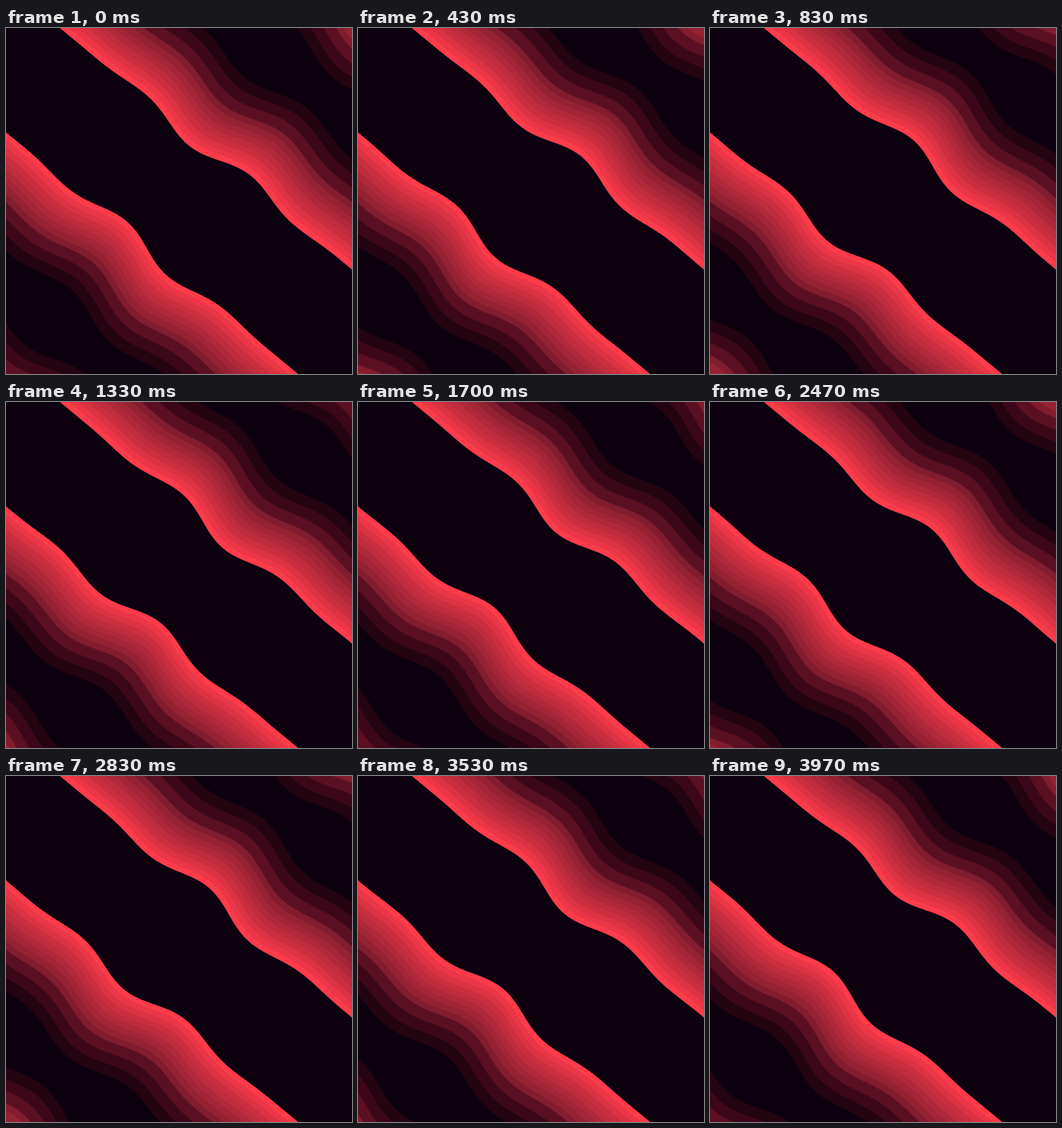
An HTML page with a canvas for the animation above (4.01 s loop, 480x480 px).

```html
<!DOCTYPE html>
<html lang="en">
<head>
<meta charset="utf-8">
<title>Red waves</title>
<style>
  html, body { margin: 0; width: 100%; height: 100%; overflow: hidden; background: #0d010f; }
  canvas { display: block; }
</style>
</head>
<body>
<canvas id="stage" width="480" height="480"></canvas>
<script>
const ctx = document.getElementById('stage').getContext('2d');
const LOOP = 4010, FRAMES = 120, CYCLE = 60;
const DARK = '#0d010f';
const ANGLE = 0.691, REACH = 350;
const HALF = 79.6, REPEAT = 480;            // dark strip half width, distance between strips
const WAVE = 208, AMP = 12.5, FADE = 245, SHIFT = 43;

// Distance from the strip's edge at which each colour begins
const bands = [
  [0, '#fd3b4a'], [8, '#ea3646'], [16, '#db3343'], [24, '#cb2f3f'],
  [32, '#be2c3d'], [40, '#b0293a'], [48, '#a32537'], [56, '#952233'],
  [65, '#821c2f'], [74, '#5a1022'], [90, '#3c0819'], [106, '#230410'], [122, DARK]
];

function ripple(x, frame) {
  if (Math.abs(x) > FADE) return 0;
  const envelope = Math.cos(Math.PI * x / (2 * FADE)) ** 2;
  return -AMP * envelope * Math.cos(2 * Math.PI * ((x + SHIFT) / WAVE + frame / CYCLE));
}

// Fills everything beyond a wavy line on one side of the axis
function fillBeyond(side, distance, sway, frame, color) {
  ctx.beginPath();
  ctx.moveTo(-REACH, side * REACH);
  for (let x = -REACH; x <= REACH; x += 2) {
    ctx.lineTo(x, side * (distance + sway * ripple(x, frame)));
  }
  ctx.lineTo(REACH, side * REACH);
  ctx.fillStyle = color;
  ctx.fill();
}

function draw(frame) {
  ctx.setTransform(1, 0, 0, 1, 0, 0);
  ctx.fillStyle = DARK;
  ctx.fillRect(0, 0, 480, 480);
  ctx.translate(240, 240);
  ctx.rotate(ANGLE);
  for (const side of [-1, 1]) {
    for (const [start, color] of bands) {
      fillBeyond(side, HALF + start, 1, frame, color);
    }
    // The neighbouring strip mirrors the same bands
    for (let i = bands.length - 1; i > 0; i--) {
      const distance = REPEAT - HALF - bands[i][0];
      if (distance < REACH - AMP) fillBeyond(side, distance, -1, frame, bands[i - 1][1]);
    }
  }
}

const begin = performance.now();
function tick() {
  const time = Math.max(0, performance.now() - begin) % LOOP;
  const rounded = Math.floor(time / 10) * 10;
  draw(Math.min(FRAMES - 1, Math.floor((rounded + 4) * 0.03)));
  requestAnimationFrame(tick);
}
tick();
</script>
</body>
</html>
```
